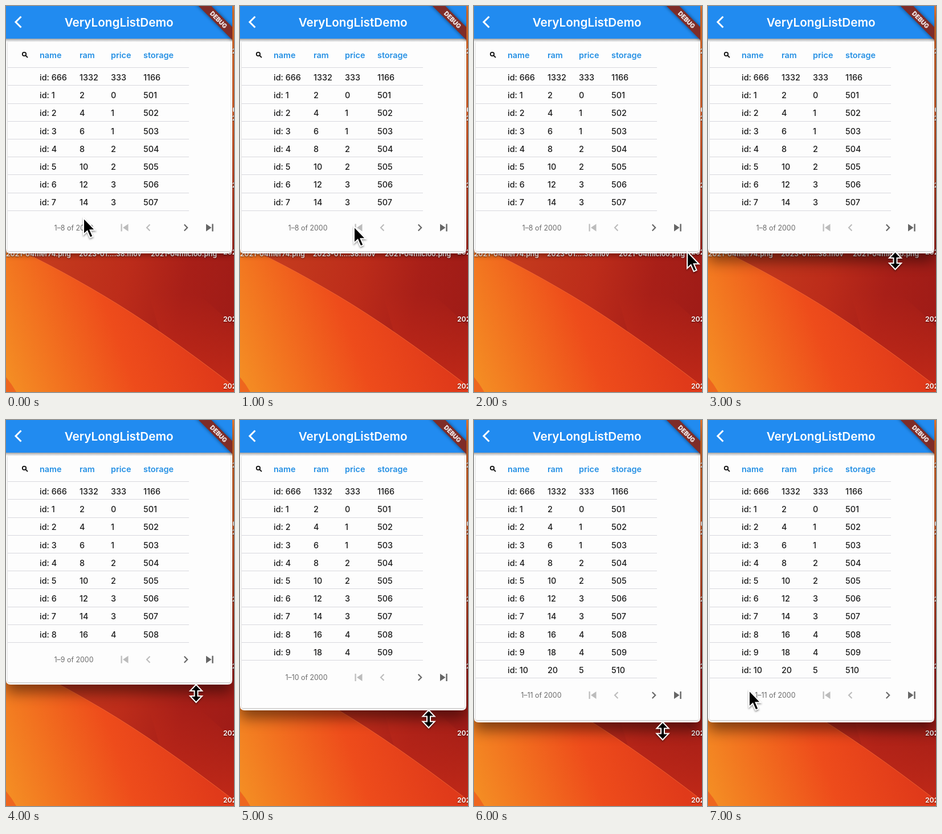
An HTML page that plays this animation: 400 px wide and 674 px high, repeating every 8000 ms.

```html
<!DOCTYPE html>
<html lang="en">
<head>
<meta charset="utf-8">
<title>VeryLongListDemo</title>
<style>
  html, body { margin: 0; width: 100%; height: 100%; overflow: hidden; background: #d03a1a; }
  svg { display: block; width: 100vw; height: 100vh; }
  text { font-family: Inter, Roboto, sans-serif; }
  .label { font-size: 12.2px; font-weight: 600; fill: #fff; filter: drop-shadow(0 1px 1px #0008); }
  .head { font-size: 14.4px; font-weight: 600; fill: #2590e4; }
  .cell { font-size: 14.4px; font-weight: 500; fill: #1c1c1c; }
  .rule { stroke: #d8d8de; stroke-width: 1; }
  .card { fill: #fdfdfd; filter: drop-shadow(0 1px 1px #0004); }
  .off { fill: #bcbcbc; }
  .on { fill: #666; }
  .cursor { fill: #000; stroke: #fff; stroke-width: 2; filter: drop-shadow(0 2px 1.5px #0006); }
</style>
</head>
<body>
<svg viewBox="0 0 400 674" preserveAspectRatio="none">
  <defs>
    <linearGradient id="back" gradientUnits="userSpaceOnUse" x1="60" y1="430" x2="400" y2="500">
      <stop offset="0" stop-color="#c53c1e"/>
      <stop offset=".45" stop-color="#bc2c1a"/>
      <stop offset=".75" stop-color="#a81f18"/>
      <stop offset="1" stop-color="#a01c17"/>
    </linearGradient>
    <linearGradient id="low" x1="0" y1="0" x2="0" y2="1">
      <stop offset=".3" stop-color="#c82c18" stop-opacity="0"/>
      <stop offset="1" stop-color="#c82c18" stop-opacity=".85"/>
    </linearGradient>
    <linearGradient id="front" gradientUnits="userSpaceOnUse" x1="0" y1="660" x2="330" y2="540">
      <stop offset="0" stop-color="#f48f24"/>
      <stop offset=".28" stop-color="#f2701f"/>
      <stop offset=".6" stop-color="#ee4c1b"/>
      <stop offset="1" stop-color="#e03a1a"/>
    </linearGradient>
    <linearGradient id="edge" x1="0" y1="0" x2="0" y2="1">
      <stop offset="0" stop-color="#e8742a"/>
      <stop offset=".5" stop-color="#d85a24"/>
      <stop offset="1" stop-color="#a02018"/>
    </linearGradient>
    <linearGradient id="barShade" x1="0" y1="0" x2="0" y2="1">
      <stop offset="0" stop-color="#555" stop-opacity=".55"/>
      <stop offset="1" stop-color="#777" stop-opacity="0"/>
    </linearGradient>
    <clipPath id="bar"><rect width="397" height="62"/></clipPath>
  </defs>

  <rect width="400" height="674" fill="url(#back)"/>
  <path d="M230 430Q320 480 400 560V674H300Z" fill="url(#low)"/>
  <path d="M0 416Q70 446 170 505T400 664V674H0Z" fill="url(#front)"/>
  <path d="M0 416Q70 446 170 505T400 664" fill="none" stroke="#f87038" stroke-opacity=".7"/>
  <path d="M0 648Q10 660 18 674H0Z" fill="#ee661e"/>
  <rect x="397" width="3" height="430" fill="url(#edge)"/>
  <rect x="398" y="177" width="4" height="8" rx="2" fill="#fff"/>
  <g id="labels"></g>

  <path id="win" fill="#fcfcfc"/>
  <rect id="card" class="card" x="3" y="62" width="391" rx="2"/>
  <rect y="57" width="397" height="6" fill="url(#barShade)"/>
  <g clip-path="url(#bar)">
    <rect width="397" height="57" fill="#218bf0"/>
    <path d="M26.500 18.500 17 28l9.500 9.500" fill="none" stroke="#fff" stroke-width="3"/>
    <text x="198.200" y="35.500" text-anchor="middle" font-size="20.700" font-weight="600" fill="#fff">VeryLongListDemo</text>
    <g transform="translate(373 24) rotate(45)" style="filter:drop-shadow(0 0 3px #0008)">
      <rect x="-70" y="-8" width="140" height="16" fill="#7e2c28"/>
      <text y="3.900" text-anchor="middle" font-size="10.600" font-weight="800" fill="#fff">DEBUG</text>
    </g>
  </g>

  <g fill="none" stroke="#111" stroke-width="1.800">
    <circle cx="32" cy="84" r="3.200"/><path d="M34.400 86.400 38 90"/>
  </g>
  <g id="table"></g>

  <g id="pager">
    <text id="range" x="153.500" y="4.500" text-anchor="end" font-size="12.400" fill="#6c6c6c"></text>
    <path class="off" d="M201.500-6.500h2.200v13h-2.200zM214.500-6.500v13L205 0z"/>
    <path class="off" d="M251.700-6.200 253.200-4.700 248.500 0 253.200 4.700 251.700 6.200 245.500 0z"/>
    <path class="on" d="M313.500-6.200 312-4.700 316.700 0 312 4.700 313.500 6.200 319.700 0z"/>
    <path class="on" d="M351-6.500v13L360.500 0zM361.300-6.500h2.400v13h-2.400z"/>
  </g>

  <path id="arrow" class="cursor" d="M0 0V29L6.500 23 11.500 34.500 16.500 32.300 11.600 21.200H20.500Z"/>
  <path id="resize" class="cursor" d="M0-15.500 10.500-4.500H3V4.500H10.500L0 15.500-10.500 4.500H-3V-4.500H-10.500Z"/>
</svg>

<script>
const $ = id => document.getElementById(id);
const ROW = 31.2, COLS = [59, 129, 184, 241], STEP = 1000;

// cursor, x, y, visible rows, window bottom, window raised
const steps = [
  ['arrow', 136, 370, 8, 432, 0],
  ['arrow', 200, 385, 8, 432, 0],
  ['arrow', 374, 429, 8, 432, 0],
  ['resize', 328.5, 444.5, 8, 432, 1],
  ['resize', 333.5, 477.5, 9, 462, 1],
  ['resize', 331, 522, 10, 507, 1],
  ['resize', 331, 543, 11, 528, 1],
  ['arrow', 72, 472, 11, 528, 1]
];

const text = (cls, x, y, s) => `<text class="${cls}" x="${x}" y="${y}">${s}</text>`;
const rule = y => `<path class="rule" d="M3 ${y}H321"/>`;
const line = (cls, y, vals) => vals.map((v, i) => text(cls, COLS[i], y, v)).join('');

let labels = text('label', 0, 437, '2021-04mer74.png')
  + text('label', 128, 437, '2023-01....38.mov')
  + text('label', 254, 437, '2021-04micloo.png');
for (let i = 0; i < 6; i++) labels += text('label', 381, 83 + i * 117, '2023-0');
$('labels').innerHTML = labels;

let table = line('head', 91, ['name', 'ram', 'price', 'storage']) + rule(107.5);
for (let i = 0; i < 11; i++) {
  const id = i || 666;
  table += '<g class="row">'
    + line('cell', Math.round(129.9 + i * ROW), ['id: ' + id, id * 2, id >> 1, id + 500])
    + rule(Math.round(107.2 + (i + 1) * ROW) + 0.5) + '</g>';
}
$('table').innerHTML = table;
const rows = document.querySelectorAll('.row');

function show([kind, x, y, count, bottom, raised]) {
  $('win').setAttribute('d', `M0 0H397V${bottom - 8}q0 8-8 8H8q-8 0-8-8Z`);
  $('win').style.filter = raised
    ? 'drop-shadow(0 14px 12px #0007)'
    : 'drop-shadow(0 4px 5px #0005)';
  $('card').setAttribute('height', bottom - 66);
  rows.forEach((r, i) => r.style.display = i < count ? '' : 'none');
  $('pager').setAttribute('transform', `translate(0 ${387 + (count - 8) * ROW})`);
  $('range').textContent = `1–${count} of 2000`;
  for (const id of ['arrow', 'resize']) $(id).style.display = id === kind ? '' : 'none';
  $(kind).setAttribute('transform', `translate(${x} ${y})`);
}

let last = -1;
function tick() {
  const now = Math.floor(performance.now() / STEP) % steps.length;
  if (now !== last) show(steps[last = now]);
  requestAnimationFrame(tick);
}
tick();
</script>
</body>
</html>
```
